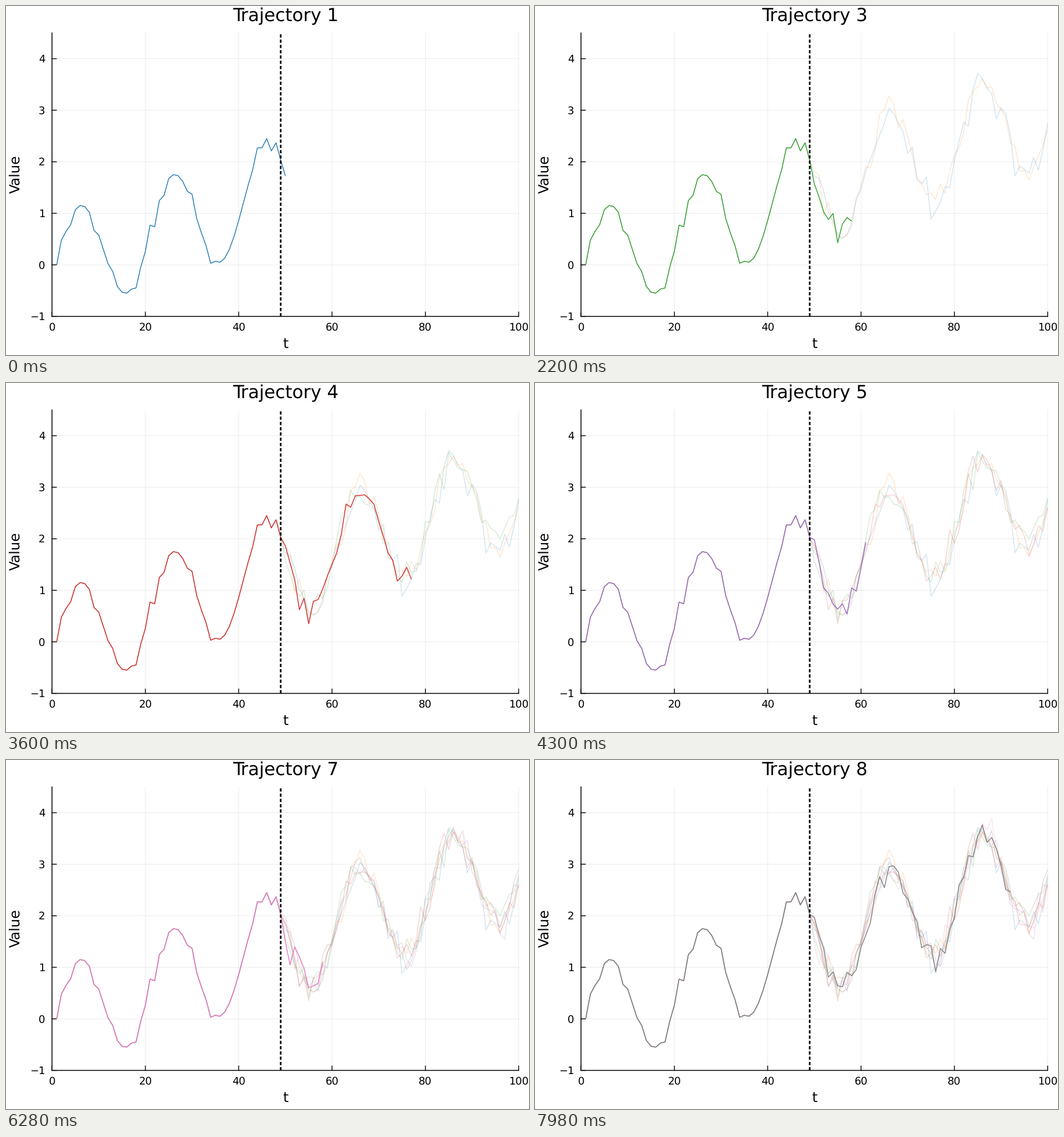
These frames come from a looping animation (900x600 px, 8000 ms). A matplotlib script:

```python
import numpy as np
import matplotlib.pyplot as plt
from matplotlib.animation import FuncAnimation

plt.rcParams.update({"path.snap": False, "text.hinting": "no_hinting",
                     "text.hinting_factor": 1, "font.family": "DejaVu Sans"})

W, H, DPI = 900, 600, 100
PX = 72 / DPI
LEFT, RIGHT, TOP, BOTTOM = 79.2, 882.3, 46.3, 533.6
T_NOW, T_END = 49, 100
STEPS = T_END - T_NOW          # pictures per trajectory
TICK, GUIDE, TITLE = 17.7, 24.3, 31
COLORS = ["#1f77b4", "#ff7f0e", "#2ca02c", "#d62728",
          "#9467bd", "#8c564b", "#e377c2", "#7f7f7f"]

# the clearest kinks in the otherwise regular past
KINKS = {2: .14, 4: -.12, 9: -.16, 13: .1, 18: -.15, 21: .17, 22: -.2,
         24: -.15, 30: .19, 34: -.15, 44: .17, 46: .1, 47: -.12, 48: .15}


def px(t):
    return LEFT + (RIGHT - LEFT) * np.asarray(t) / 100


def py(v):
    return BOTTOM - (BOTTOM - TOP) * (np.asarray(v) + 1) / 5.5


def trajectory(k):
    """Seasonal wave on a rising trend, with a noisy future."""
    t = np.arange(1, T_END + 1)
    values = np.sin(np.pi * (t - 1) / 10) + 0.03 * (t - 1)
    for when, size in KINKS.items():
        values[when - 1] += size
    noise = np.random.default_rng(20 + k).normal(0, 0.15, STEPS)
    values[T_NOW:] += noise
    return values


fig = plt.figure(figsize=(W / DPI, H / DPI), dpi=DPI, facecolor="white")
ax = fig.add_axes([0, 0, 1, 1])
ax.set_xlim(0, W)
ax.set_ylim(H, 0)
ax.axis("off")


def stroke(xs, ys, width, color="black", **kw):
    return ax.plot(xs, ys, lw=width * PX, color=color, **kw)[0]


def label(x, y, s, size, ha="center", **kw):
    return ax.text(x, y, s, fontsize=size * PX, ha=ha, va="baseline", **kw)


# grid, ticks and axes
for t in range(0, 101, 20):
    x = px(t)
    stroke([x, x], [TOP, BOTTOM], 1, alpha=0.08, zorder=1)
    stroke([x, x], [BOTTOM, BOTTOM - 7.5], 1.4, zorder=2)
    label(x, 557.4, str(t), TICK)
for v in range(-1, 5):
    y = py(v)
    stroke([LEFT, RIGHT], [y, y], 1, alpha=0.08, zorder=1)
    stroke([LEFT, LEFT + 7.5], [y, y], 1.4, zorder=2)
    label(67.2, y + 6.4, str(v).replace("-", "\u2212"), TICK, ha="right")
stroke([LEFT, LEFT, RIGHT], [TOP, BOTTOM, BOTTOM], 1.5, zorder=2,
       solid_joinstyle="miter")
label(480.7, 588, "t", GUIDE)
label(23.3, 289.5, "Value", GUIDE, rotation=90, rotation_mode="anchor")
title = label(481.3, 27, "", TITLE)

# marker between past and forecast
stroke([px(T_NOW)] * 2, [BOTTOM, TOP], 2.8, zorder=6,
       linestyle=(0, (2.0, 1.23)), dash_capstyle="butt")

xs = px(np.arange(1, T_END + 1))
curves = [py(trajectory(k)) for k in range(len(COLORS))]
lines = [stroke([], [], 1.4, c, zorder=3, solid_capstyle="butt")
         for c in COLORS]


def draw(i):
    current, step = divmod(i, STEPS)
    title.set_text(f"Trajectory {current + 1}")
    for k, line in enumerate(lines):
        count = T_NOW + 1 + step if k == current else T_END
        line.set_data(xs[:count], curves[k][:count])
        line.set_alpha(1 if k == current else 0.2)
        line.set_zorder(4 if k == current else 3)
        line.set_visible(k <= current)
    return [title, *lines]


anim = FuncAnimation(fig, draw, frames=400, interval=20, repeat=True,
                     repeat_delay=0, init_func=lambda: draw(0))
plt.show()
```
